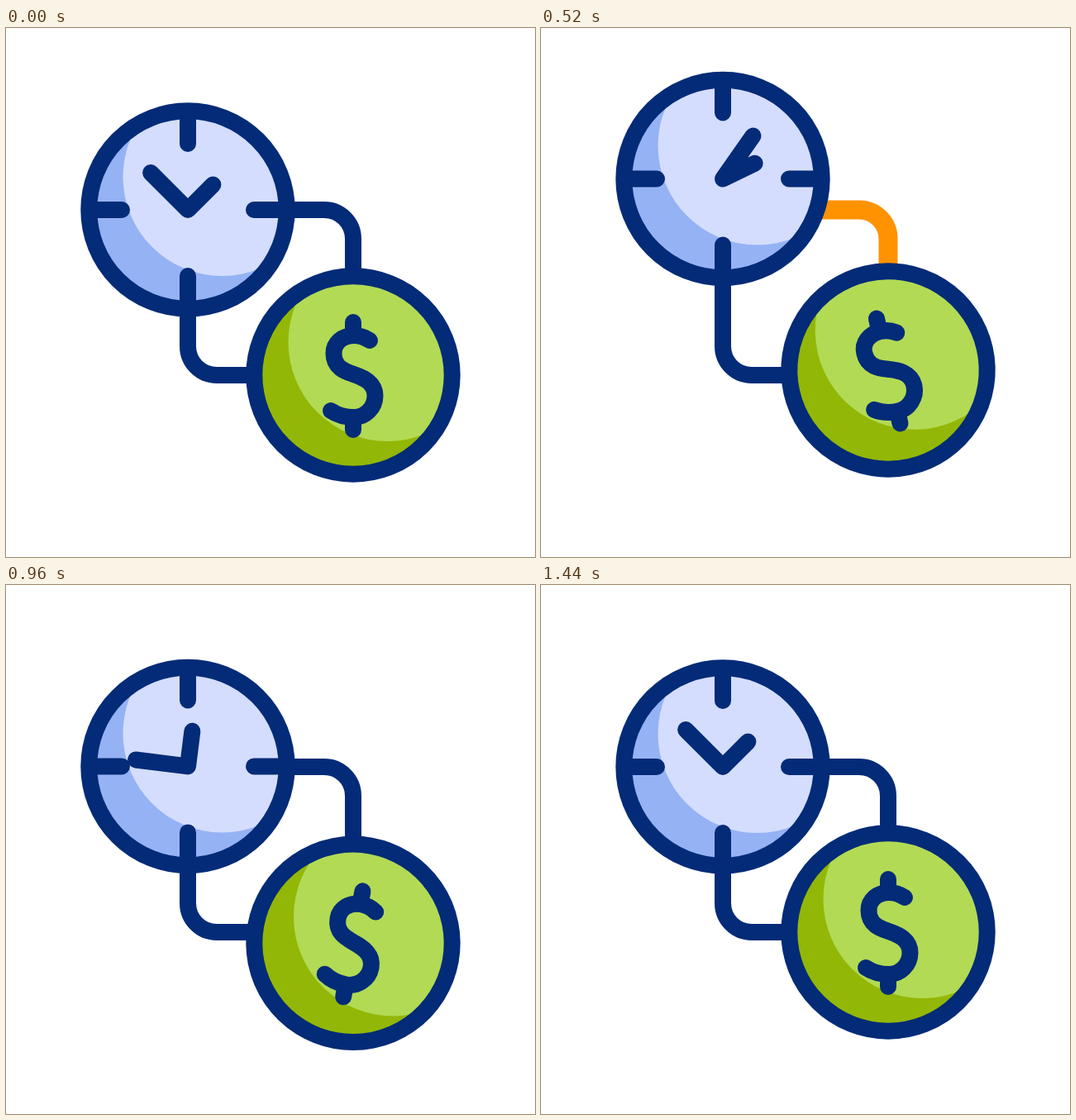
Recreate the animation shown at these times as an HTML page with a canvas. Size 640 by 640 pixels, loop 1600 ms.

```html
<!DOCTYPE html>
<html lang="en">
<head>
<meta charset="utf-8">
<title>Time and money</title>
<style>
html, body { margin: 0; width: 100%; height: 100%; overflow: hidden; background: #fff; }
canvas { display: block; width: 640px; height: 640px; }
</style>
</head>
<body>
<canvas id="stage" width="640" height="640"></canvas>
<script>
const ctx = document.getElementById('stage').getContext('2d');
const LOOP = 1600, STEP = 20;
const NAVY = '#032b77', ORANGE = '#ff9200';

// Keyframes as [time in ms, value], eased between neighbours.
const motion = {
  clockY: [[200, 0], [360, 19], [552, -42], [820, 16.3], [1065, -11.5], [1400, 0]],
  coinY: [[280, 0], [440, 19.7], [620, -42], [884, 20], [1140, -11.5], [1440, 0]],
  coinTurn: [[440, 0], [640, -36], [856, 32], [1090, -20], [1440, 0]],
  longHand: [[200, -45], [360, -60], [1080, 693], [1400, 675]],
  shortHand: [[240, 45], [400, 36], [1120, 415], [1440, 405]],
  topHead: [[350, 0], [550, 1]],
  topTail: [[575, 0], [775, 1]],
  bottomHead: [[478, 0], [678, 1]],
  bottomTail: [[710, 0], [910, 1]]
};

const link = new Path2D('M310 220H385A35 35 0 0 1 420 255V340');
const LINK_LENGTH = 75 + 35 * Math.PI / 2 + 85;
const dollar = new Path2D('M20-42C14-46 8-48 1-48C-13-48-23.5-39-23.5-26.5' +
  'C-23.5-8-8-4 2-.5C12 3 26.5 9 26.5 25C26.5 40 14 51 1 51C-10 51-18 49-27 43' +
  'M0-64V-50M0 51V66');
const ticks = new Path2D('M0-119V-80M0 119V80M-119 0H-80M119 0H80');

const radians = degrees => degrees * Math.PI / 180;

function valueAt(keys, t) {
  if (t <= keys[0][0]) return keys[0][1];
  for (let i = 1; i < keys.length; i++) {
    const [t0, a] = keys[i - 1], [t1, b] = keys[i];
    if (t < t1) {
      const u = (t - t0) / (t1 - t0);
      return a + (b - a) * u * u * (3 - 2 * u);
    }
  }
  return keys[keys.length - 1][1];
}

function stroke(path, color = NAVY, width = 20) {
  ctx.strokeStyle = color;
  ctx.lineWidth = width;
  ctx.stroke(path);
}

function circle(x, y, r) {
  const path = new Path2D();
  path.arc(x, y, r, 0, Math.PI * 2);
  return path;
}

function drawLink(head, tail) {
  stroke(link);
  if (head <= tail) return;
  ctx.setLineDash([(head - tail) * LINK_LENGTH, 1000]);
  ctx.lineDashOffset = -tail * LINK_LENGTH;
  stroke(link, ORANGE, 23);
  ctx.setLineDash([]);
}

function drawDisc(shade, light) {
  const face = circle(0, 0, 119.7);
  ctx.save();
  ctx.clip(face);
  ctx.fillStyle = shade;
  ctx.fill(face);
  ctx.fillStyle = light;
  ctx.fill(circle(41.5, -40, 120));
  ctx.restore();
  stroke(face);
}

function handTip(angle, length) {
  return [length * Math.sin(radians(angle)), -length * Math.cos(radians(angle))];
}

function drawClock(pose) {
  ctx.save();
  ctx.translate(220, 220 + pose.clockY);
  drawDisc('#95b2f4', '#d4ddfd');
  stroke(ticks);
  const hands = new Path2D();
  hands.moveTo(...handTip(pose.longHand, 63.5));
  hands.lineTo(0, 0);
  hands.lineTo(...handTip(pose.shortHand, 43));
  stroke(hands);
  ctx.restore();
}

function drawCoin(pose) {
  ctx.save();
  ctx.translate(420, 420 + pose.coinY);
  ctx.rotate(radians(pose.coinTurn));
  drawDisc('#93b706', '#b2da54');
  stroke(dollar);
  ctx.restore();
}

function draw(t) {
  const pose = {};
  for (const name in motion) pose[name] = valueAt(motion[name], t);
  ctx.fillStyle = '#fff';
  ctx.fillRect(0, 0, 640, 640);
  drawLink(pose.topHead, pose.topTail);
  // The lower link is the upper one turned half way round the centre.
  ctx.save();
  ctx.translate(640, 640);
  ctx.rotate(Math.PI);
  drawLink(pose.bottomHead, pose.bottomTail);
  ctx.restore();
  drawClock(pose);
  drawCoin(pose);
}

ctx.lineCap = ctx.lineJoin = 'round';
const start = performance.now();

function frame() {
  const t = (performance.now() - start) % LOOP;
  draw(Math.floor(t / STEP) * STEP);
  requestAnimationFrame(frame);
}
frame();
</script>
</body>
</html>
```
